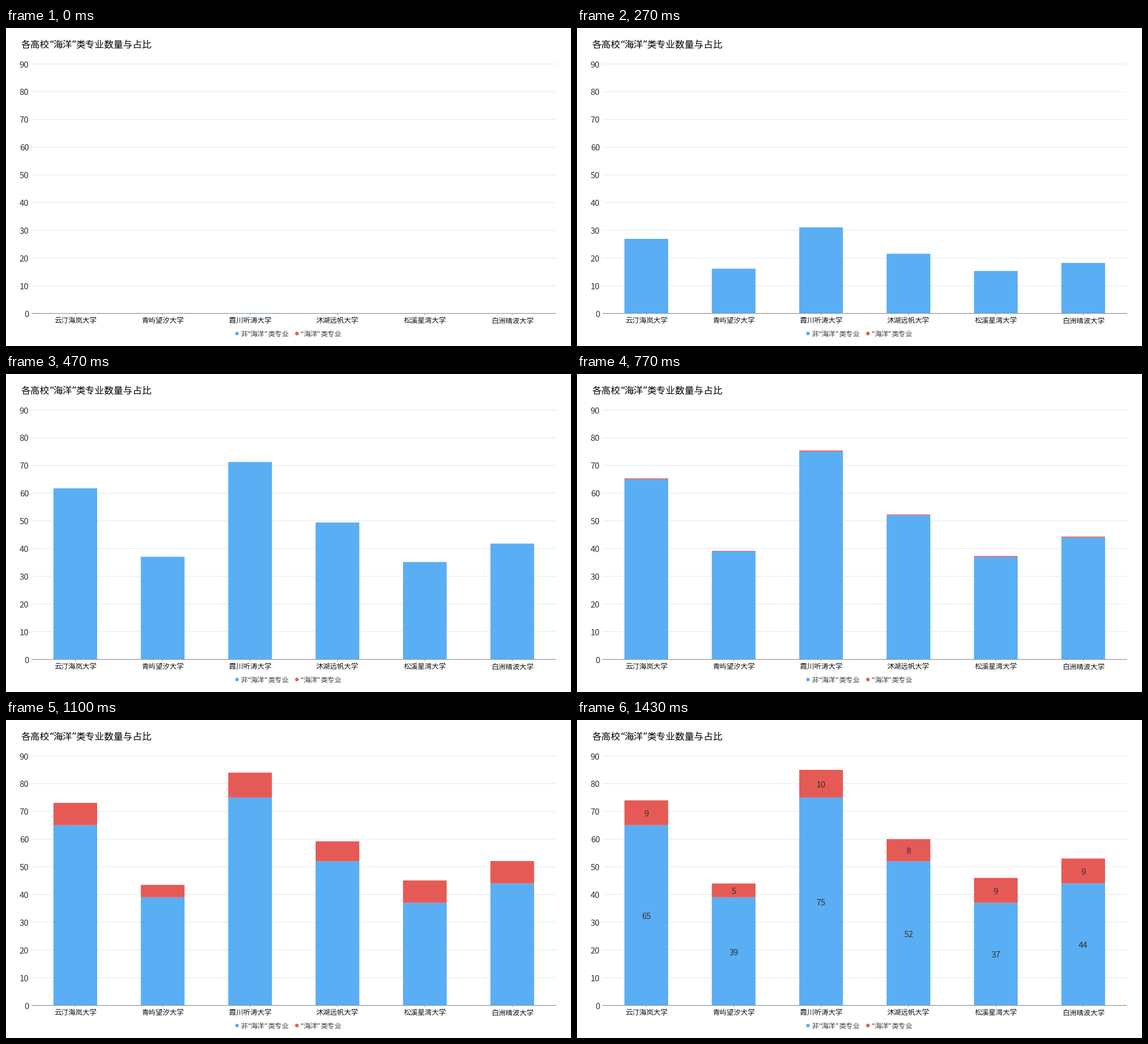
These frames come from a looping animation (998x561 px, 2.51 s). A matplotlib script:

```python
import numpy as np
import matplotlib.pyplot as plt
from matplotlib.animation import FuncAnimation
from matplotlib.patches import Circle, Rectangle

W, H, DPI = 998, 561, 100
LOOP_MS, STEP_MS = 2510, 10
PX = 72 / DPI
BLUE, RED, AXIS = "#5aaef3", "#e65a56", "#7d8087"
LEFT, RIGHT, BASE, UNIT = 45.2, 971.4, 503.5, 440 / 90
CJK, QUOTE_FONT = "Noto Sans CJK JP", "DejaVu Sans"

SCHOOLS = ["云汀海岚大学", "青屿望汐大学", "霞川听涛大学",
           "沐湖远帆大学", "松溪星湾大学", "白洲晴波大学"]
OTHER = [65, 39, 75, 52, 37, 44]
MARINE = [9, 5, 10, 8, 9, 9]

# Motion is paced at 30 ticks per second
GROW_TICKS = 20.12
BLUE_START, RED_START = -1.446, 18.78
LABEL_START, LABEL_TICKS = 40, 3

fig = plt.figure(figsize=(W / DPI, H / DPI), dpi=DPI, facecolor="white")
ax = fig.add_axes([0, 0, 1, 1])
ax.set(xlim=(0, W), ylim=(H, 0))
ax.axis("off")


def write(x, y, text, size, color, ha="left", font=CJK, **kw):
    return ax.text(x, y, text, fontsize=size * PX, color=color, ha=ha,
                   va="baseline", family=font, **kw)


def write_quoted(x, y, text, size, color):
    """Set CJK text whose curly quotes take less than a full em."""
    run = ""
    for char in text + "\0":
        if char not in "“”\0":
            run += char
            continue
        if run:
            write(x, y, run, size, color)
            x += len(run) * size
            run = ""
        if char != "\0":
            shift = 0.24 if char == "“" else 0.18
            write(x + shift * size, y, char, size, color, "center", QUOTE_FONT)
            x += 0.41 * size


def number(x, y, value, ha):
    return write(x, y + 6, str(value), 15, "#333333", ha, zorder=5)


def line(xs, ys, color):
    ax.plot(xs, ys, color=color, lw=PX, snap=False, zorder=1,
            solid_capstyle="butt")


def y_of(value):
    return BASE - value * UNIT


def ease(tick, start):
    p = np.clip((tick - start) / GROW_TICKS, 0, 1)
    return 4 * p ** 3 if p < 0.5 else 1 - 4 * (1 - p) ** 3


write_quoted(26.5, 35, "各高校“海洋”类专业数量与占比", 16.7, "black")

for value in range(0, 100, 10):
    y = y_of(value)
    number(40.5, y, value, "right")
    line([LEFT, RIGHT], [y, y], "#e6e6e6" if value else AXIS)

slot = (RIGHT - LEFT) / len(SCHOOLS)
centers = LEFT + slot * (np.arange(len(SCHOOLS)) + 0.5)


def add_bars(color):
    return [ax.add_patch(Rectangle((x - slot / 4, BASE), slot / 2, 0, fc=color,
                                   lw=0, snap=False, zorder=2))
            for x in centers]


blue_bars, red_bars = add_bars(BLUE), add_bars(RED)
labels = []
for x, school, other, marine in zip(centers, SCHOOLS, OTHER, MARINE):
    line([x, x], [BASE, BASE + 3], AXIS)
    write(x, 520.7, school, 12.5, "#111111", "center")
    for middle, value in ((other / 2, other), (other + marine / 2, marine)):
        labels.append(number(x, y_of(middle) + 0.4, value, "center"))

for x, color, text in ((408, BLUE, "非“海洋”类专业"), (513.8, RED, "“海洋”类专业")):
    ax.add_patch(Circle((x, 539), 3.2, fc=color, lw=0))
    write_quoted(x + 6.3, 543.7, text, 12.5, "#444444")


def update(frame):
    tick = int((frame + 0.5) * 0.3)
    blue, red = ease(tick, BLUE_START), ease(tick, RED_START)
    for bar, cap, other, marine in zip(blue_bars, red_bars, OTHER, MARINE):
        bar.set_height(-other * blue * UNIT)
        cap.set_y(y_of(other * blue))
        cap.set_height(-marine * red * UNIT)
        cap.set_visible(red > 0)
    alpha = float(np.clip((tick - LABEL_START) / LABEL_TICKS, 0, 1))
    for label in labels:
        label.set_alpha(alpha)
        label.set_visible(alpha > 0)
    return [*blue_bars, *red_bars, *labels]


anim = FuncAnimation(fig, update, frames=LOOP_MS // STEP_MS, interval=STEP_MS,
                     repeat=True, repeat_delay=0, blit=False)
plt.show()
```
